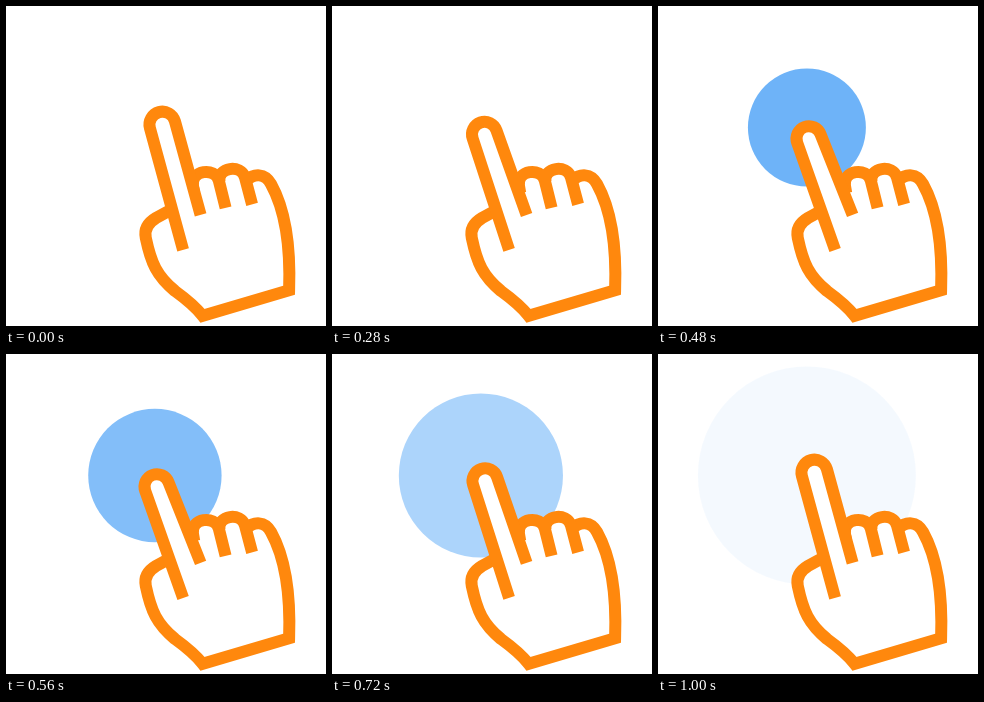
An HTML page without scripts that plays this animation: 320 by 320 pixels, repeating every 1080 ms.

```html
<!DOCTYPE html>
<html lang="en">
<head>
<meta charset="utf-8">
<title>Tap</title>
<style>
  html, body { margin: 0; width: 100%; height: 100%; overflow: hidden; background: #fff; }
  svg { display: block; width: 100%; height: 100%; }

  .ripple { fill: #5aa9f7; opacity: 0; animation: ripple 1080ms -2ms infinite; }
  .hand { fill: #fff; stroke: #ff880d; stroke-width: 12; stroke-miterlimit: 10; }
  .finger { animation: press 1080ms -2ms infinite; }

  /* one step every 40 ms */
  @keyframes ripple {
    0% { r: 51.3px; opacity: 0; animation-timing-function: step-end; }
    37.037% { r: 51.3px; opacity: 1; animation-timing-function: steps(15, end); }
    92.593%, 100% { r: 109px; opacity: .0625; }
  }
  @keyframes press {
    0%, 88.889%, 100% {
      d: path("M177.1 243.9L143.9 122A12.95 12.95 0 0 1 168.9 115.2L194.6 208.9");
      animation-timing-function: steps(10, end);
    }
    37.037%, 51.852% {
      d: path("M177.1 243.9L139.3 137A12.35 12.35 0 0 1 162.5 128.2L194.6 208.9");
      animation-timing-function: steps(10, end);
    }
  }
</style>
</head>
<body>
<svg viewBox="0 0 320 320">
  <circle class="ripple" cx="148.9" cy="121.5" r="51.3"/>
  <g class="hand">
    <!-- palm, thumb and little finger -->
    <path d="M166 203.2L150 212C142 216.8 138 223.5 139.8 232C145 257 150.8 270 169 285C178 291.5 188 299 196.6 309.8L283.1 284.3C284.7 240 278.9 203 265 178C259 167 248 167 240 175"/>
    <!-- bent fingers -->
    <path d="M213.5 176C211 161 235 158 239 171.5L246.1 198.4"/>
    <path d="M188.2 187L187 180C184.5 164 209 161 212.8 174.5L219.6 201.9"/>
    <path class="finger" d="M177.1 243.9L143.9 122A12.95 12.95 0 0 1 168.9 115.2L194.6 208.9"/>
  </g>
</svg>
</body>
</html>
```
